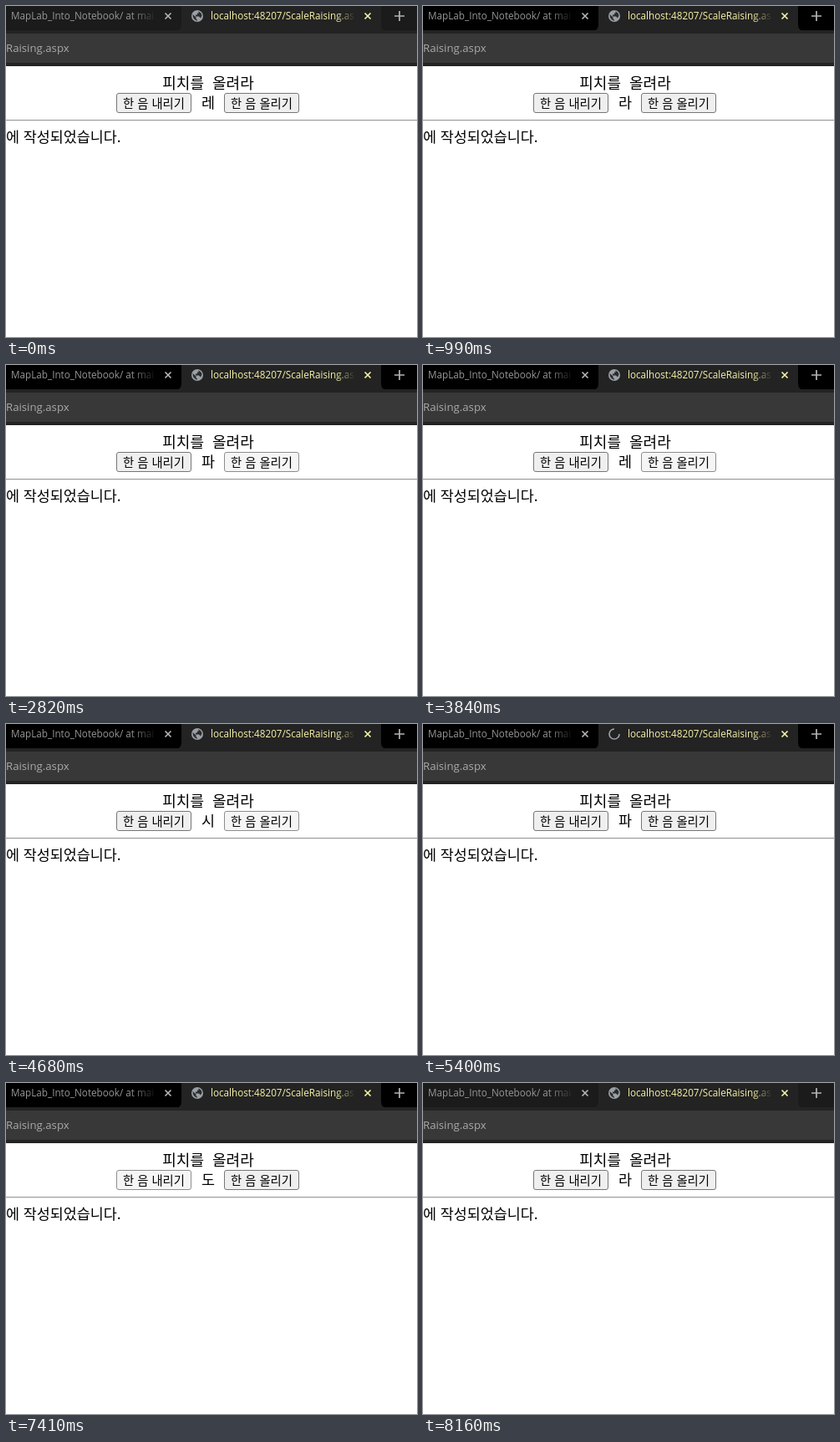
An HTML page for the animation above (8.22 s loop, 492 by 396 pixels).

```html
<!DOCTYPE html>
<html lang="ko">
<head>
<meta charset="utf-8">
<title>피치를 올려라</title>
<style>
  html, body { margin: 0; width: 100%; height: 100%; overflow: hidden; background: #fff; }
  svg { display: block; }
  text { font-family: "Noto Sans CJK KR", "Noto Sans CJK", "Noto Sans CJK JP", sans-serif; font-size: 17.4px; }
  .ui { font-family: "Open Sans", "Noto Sans", sans-serif; font-size: 11.7px; }
  .label { font-size: 14.3px; }
  .title { font-size: 18px; word-spacing: 5px; }
  .middle { text-anchor: middle; }
  .button rect { fill: #efefef; stroke: #767676; }
  .button.pressed rect { fill: #f5f5f5; stroke: #8d8d8d; }
  .icon { fill: none; stroke-width: 1.7; }
</style>
</head>
<body>
<svg width="492" height="396" viewBox="0 0 492 396">
  <defs>
    <linearGradient id="fadeLeft" gradientUnits="userSpaceOnUse" x1="150" x2="181">
      <stop stop-color="#969696"/><stop offset="1" stop-color="#969696" stop-opacity="0"/>
    </linearGradient>
    <linearGradient id="fadeRight" gradientUnits="userSpaceOnUse" x1="395" x2="418">
      <stop stop-color="#f6f2a6"/><stop offset="1" stop-color="#f6f2a6" stop-opacity="0"/>
    </linearGradient>
  </defs>

  <rect id="bar" width="492" height="30"/>
  <path d="M202 30q8 0 8-8V0H449V22q0 8 8 8z" fill="#232323"/>
  <rect y="29" width="492" height="43" fill="#232323"/>
  <rect y="33" width="492" height="35" fill="#383838"/>
  <text class="ui" x="6" y="16" fill="url(#fadeLeft)">MapLab_Into_Notebook/ at mai</text>
  <text class="ui" x="245" y="16" fill="url(#fadeRight)">localhost:48207/ScaleRaising.as</text>
  <path class="icon" stroke="#b4b4b4" d="M190.5 8.5l7 7m0-7l-7 7"/>
  <path class="icon" stroke="#f6f2a6" d="M429.5 8.5l7 7m0-7l-7 7"/>
  <path class="icon" stroke="#b4b4b4" d="M465 12h12m-6-6v12"/>
  <g id="globe">
    <circle cx="229" cy="12" r="7" fill="#9aa0a6"/>
    <path fill="#2b2b2b" d="M223.5 10l4 3.5v2l1.5 1v1.2q-5.5-1-5.5-7.7zM230 6.6q4 1 4.5 5l-1.5 3-2-2h-4v-2h2v-2h2z"/>
  </g>
  <path id="spinner" class="icon" stroke="#9aa0a6" d="M229 6a6 6 0 1 0 6 6"/>
  <text class="ui" style="font-size:13.2px" y="55" fill="#aaa">Raising.aspx</text>

  <text class="title middle" x="242" y="99">피치를 올려라</text>
  <g class="button" id="down">
    <rect x="132.5" y="104.5" width="89" height="23" rx="2.5"/>
    <text class="label middle" x="177" y="122">한 음 내리기</text>
  </g>
  <text id="note" class="middle" x="242" y="122"></text>
  <g class="button" id="up">
    <rect x="261.5" y="104.5" width="89" height="23" rx="2.5"/>
    <text class="label middle" x="306" y="122">한 음 올리기</text>
  </g>
  <path d="M0 136.5H492" stroke="#9a9a9a"/>
  <path d="M0 137.5H492" stroke="#eee"/>
  <text x="0" y="163">에 작성되었습니다.</text>
</svg>
<script>
const LOOP = 8220, NOTES = '도레미파솔라시', FIRST_NOTE = 1;
// Bursts of evenly spaced clicks: start, end, clicks, button, note change per click
const bursts = [
  [450, 690, 1, 'down', -1], [690, 990, 2, 'down', -1],
  [1230, 1290, 1, 'down', -1], [1500, 1620, 1, 'down', -1],
  [1950, 2760, 7, 'up', 1], [2820, 2940, 1, 'up', 1],
  [3210, 3960, 5, 'up', 1], [4050, 4680, 4, 'up', 1],
  [4680, 4830, 1, 'up', 1], [4890, 5700, 6, 'up', 1],
  [5760, 6120, 3, 'up', 1], [6120, 6570, 3, 'up', 1],
  [6630, 6840, 2, 'up', 1], [6990, 7050, 1, 'up', 0],
  [7200, 7500, 1, 'down', -1], [7500, 7680, 1, 'down', -1]
];
const el = id => document.getElementById(id);
const show = (id, visible) => el(id).setAttribute('visibility', visible ? 'visible' : 'hidden');

function stateAt(t) {
  let note = FIRST_NOTE, pressed = '', loading = false;
  for (const [start, end, clicks, button, step] of bursts) {
    if (t < start) break;
    const slot = (end - start) / clicks;
    const done = t >= end ? clicks : Math.floor((t - start) / slot);
    note += done * step;
    if (t < end) {
      const held = (t - start) / slot - done < 0.75;
      pressed = held ? button : '';
      loading = !held && slot > 60;
    }
  }
  return { note: (note + 7) % 7, pressed, loading };
}

function draw(now) {
  const t = now % LOOP;
  const { note, pressed, loading } = stateAt(t);
  el('note').textContent = NOTES[note];
  for (const id of ['down', 'up']) el(id).classList.toggle('pressed', id === pressed);
  show('globe', !loading);
  show('spinner', loading);
  el('bar').setAttribute('fill', t >= 630 && t < 8160 ? '#000' : '#1b1b1b');
  requestAnimationFrame(draw);
}
draw(0);
</script>
</body>
</html>
```
